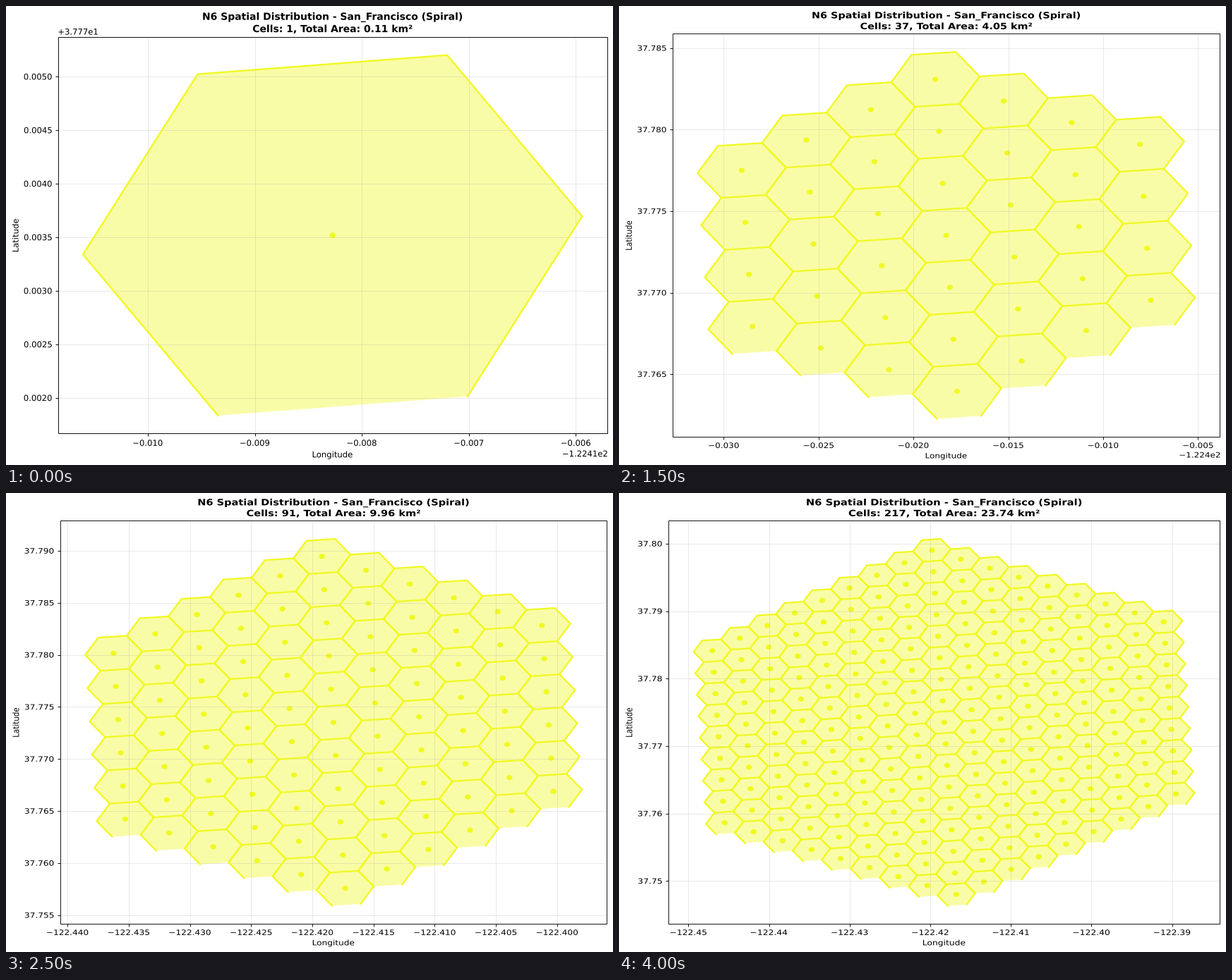
Write a matplotlib script that moves like this. It is 860 px wide and 651 px high and loops after 4500 ms.

```python
import numpy as np
import matplotlib.pyplot as plt
from matplotlib.animation import FuncAnimation
from matplotlib.collections import LineCollection, PolyCollection
from matplotlib.patches import PathPatch, Rectangle
from matplotlib.path import Path
from matplotlib.textpath import TextPath
from matplotlib.ticker import AutoLocator, ScalarFormatter

STAGE_W, STAGE_H, DPI = 860, 651, 100
PT = DPI / 72
YELLOW = "#f0f921"

# Cell geometry in degrees: two corner vectors give the whole hexagon lattice.
CENTER = np.array([-122.418274, 37.773518])
A = np.array([-0.0012612, 0.0015050])
C = np.array([0.0023325, 0.0001780])
B = A + C
HEXAGON = np.array([-B, -C, A, B, C, -A])
STEP_P, STEP_Q = A + B, B + C
CELL_AREA = 0.109412

# Page layout before the page is stretched onto the stage.
BOX_W, BOX_H = 930, 770
PAD, BOTTOM, TOP = 10, 53.2, 52.6
TICK, TICK_PAD = 3.5 * PT, 7 * PT
SMALL, LARGE = 10 * PT, 12 * PT
ANGLES = np.linspace(0, 2 * np.pi, 25)
DOT = 4.85 * np.column_stack([np.cos(ANGLES), np.sin(ANGLES)])

fig = plt.figure(figsize=(STAGE_W / DPI, STAGE_H / DPI), dpi=DPI, facecolor="white")
page = fig.add_axes([0, 0, 1, 1])


def glyphs(text, size=SMALL, weight="normal"):
    return TextPath((0, 0), text, size=size,
                    prop={"family": "DejaVu Sans", "weight": weight})


def ink_width(text):
    return glyphs(text).get_extents().width


def put_text(x, y, text, align=0.5, size=SMALL, weight="normal", upright=False):
    """Draw text with its baseline at y; align 0, 0.5, 1 = left, centre, right."""
    path = glyphs(text, size, weight)
    box = path.get_extents()
    verts = path.vertices - [box.x0 + align * box.width, 0]
    if upright:
        verts = np.column_stack([-verts[:, 1], verts[:, 0]])
    page.add_patch(PathPatch(Path(verts + [x, y], path.codes),
                             facecolor="black", linewidth=0, zorder=5))


def ticks_for(lo, hi):
    locs = AutoLocator().tick_values(lo, hi)
    fmt = ScalarFormatter()
    fmt.create_dummy_axis()
    fmt.axis.set_view_interval(lo, hi)
    fmt.axis.set_data_interval(lo, hi)
    labels = fmt.format_ticks(locs)
    shown = [(v, s) for v, s in zip(locs, labels) if lo <= v <= hi]
    return shown, fmt.get_offset()


def cell_centers(rings):
    span = range(-rings, rings + 1)
    return np.array([CENTER + i * STEP_P + j * STEP_Q
                     for i in span for j in span if abs(i + j) <= rings])


def draw(rings):
    page.clear()
    page.axis("off")

    # View limits with a 5 % margin, equal aspect inside the largest box
    centers = cell_centers(rings)
    cells = centers[:, None, :] + HEXAGON
    low, high = cells.min(axis=(0, 1)), cells.max(axis=(0, 1))
    margin = 0.05 * (high - low)
    low, high = low - margin, high + margin
    scale = min(BOX_W / (high - low)[0], BOX_H / (high - low)[1])
    width, height = scale * (high - low)

    x_ticks, x_offset = ticks_for(low[0], high[0])
    y_ticks, y_offset = ticks_for(low[1], high[1])

    left = 39.3 + max(ink_width(s) for _, s in y_ticks) + 2
    right, top = left + width, BOTTOM + height
    last_x, last_label = x_ticks[-1]
    label_end = (last_x - low[0]) * scale + ink_width(last_label) / 2 + 1
    page_w = left + max(width, label_end) + PAD
    page_h = top + TOP
    page.set_xlim(0, page_w)
    page.set_ylim(0, page_h)
    stroke = np.sqrt(STAGE_W / page_w * STAGE_H / page_h)

    def place(points):
        return (points - low) * scale + [left, BOTTOM]

    # Cells and their centres
    shapes = place(cells)
    dots = place(centers)[:, None, :] + DOT
    page.add_collection(PolyCollection(shapes, facecolor=YELLOW, alpha=0.4,
                                       linewidth=0, zorder=1), autolim=False)
    page.add_collection(PolyCollection(dots, facecolor=YELLOW,
                                       linewidth=0, zorder=1.2), autolim=False)
    page.add_collection(LineCollection(shapes, colors=YELLOW, linewidths=2 * stroke,
                                       capstyle="projecting", joinstyle="round",
                                       zorder=2), autolim=False)

    # Grid, ticks and frame
    def rule(xs, ys, color="black", alpha=1, z=3):
        page.plot(xs, ys, color=color, alpha=alpha, lw=0.8 * stroke,
                  zorder=z, solid_capstyle="butt", scalex=False, scaley=False)

    for value, label in x_ticks:
        x = left + (value - low[0]) * scale
        rule([x, x], [BOTTOM, top], "#b0b0b0", 0.3, 1.5)
        rule([x, x], [BOTTOM - TICK, BOTTOM])
        put_text(x, BOTTOM - TICK_PAD - 11, label)
    for value, label in y_ticks:
        y = BOTTOM + (value - low[1]) * scale
        rule([left, right], [y, y], "#b0b0b0", 0.3, 1.5)
        rule([left - TICK, left], [y, y])
        put_text(left - TICK_PAD - 1, y - 0.365 * SMALL, label, 1)
    page.add_patch(Rectangle((left, BOTTOM), width, height, fill=False,
                             edgecolor="black", linewidth=0.8 * stroke, zorder=4))

    # Axis names, offsets and title
    mid_x, mid_y = left + width / 2, BOTTOM + height / 2
    put_text(mid_x, BOTTOM - 40.3, "Longitude")
    put_text(PAD + 11, mid_y, "Latitude", upright=True)
    if x_offset:
        put_text(right, BOTTOM - 38.9, x_offset, 1)
    if y_offset:
        put_text(left + 1, top + 3 * PT, y_offset, 0)

    count = len(centers)
    base = top + 6 * PT
    put_text(mid_x, base + 20.8, "N6 Spatial Distribution - San_Francisco (Spiral)",
             size=LARGE, weight="bold")
    put_text(mid_x, base, f"Cells: {count}, Total Area: {count * CELL_AREA:.2f} km²",
             size=LARGE, weight="bold")
    return []


anim = FuncAnimation(fig, draw, frames=9, init_func=lambda: draw(0),
                     interval=500, repeat=True, repeat_delay=0, blit=False)
plt.show()
```
